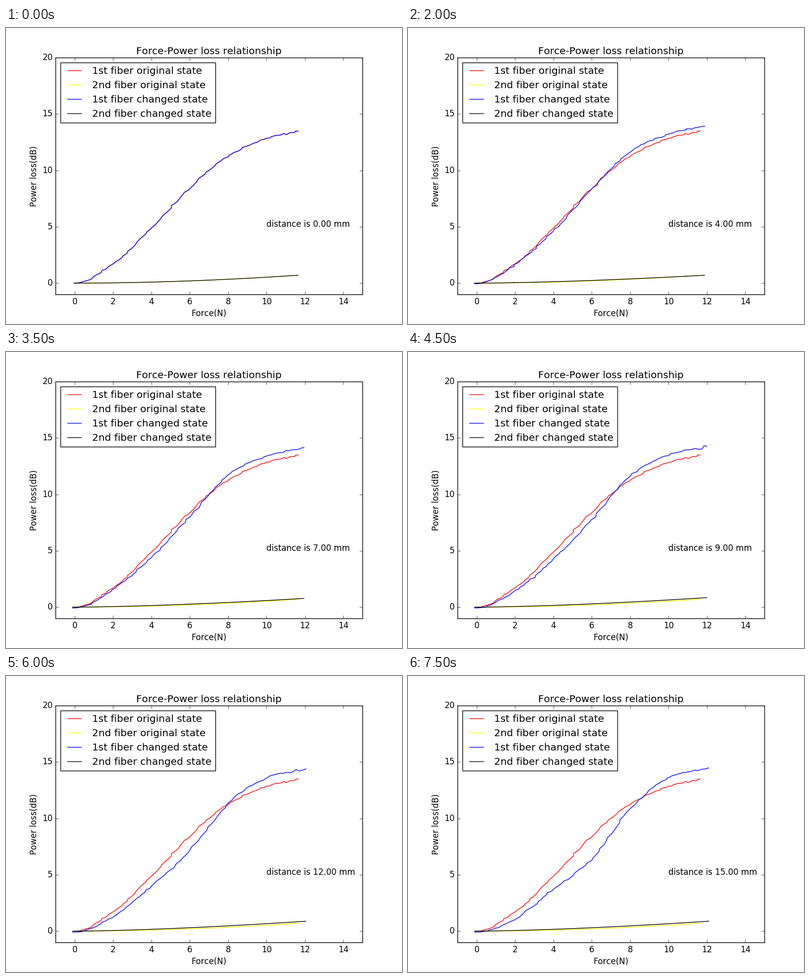
Write a matplotlib script that moves like this. It is 800 px wide and 600 px high and loops after 8000 ms.

```python
import numpy as np
import matplotlib.pyplot as plt
from matplotlib.animation import FuncAnimation

plt.style.use("classic")
plt.rcParams.update({"font.family": "DejaVu Sans", "text.kerning_factor": 6})

STEPS = 16  # displacement grows by 1 mm per step

# First fiber's loss (dB) every 2 N, with the fiber at rest, halfway and fully moved
FORCES = np.arange(0, 13, 2)
REST = np.array([0.00, 1.70, 4.87, 8.48, 11.27, 12.82, 13.62])
HALF = np.array([-0.08, 1.52, 4.34, 7.97, 11.70, 13.42, 14.18])
FULL = np.array([-0.08, 1.08, 3.70, 6.40, 10.85, 13.60, 14.48])


def smooth(x, kx, ky):
    """Cubic Hermite curve through the knots, flat at the first one."""
    m = np.gradient(ky, kx)
    m[0] = 0
    x = np.clip(x, kx[0], kx[-1])
    i = np.clip(np.searchsorted(kx, x) - 1, 0, len(kx) - 2)
    h = kx[i + 1] - kx[i]
    t = (x - kx[i]) / h
    return ((1 + 2 * t) * (1 - t) ** 2 * ky[i] + t * (1 - t) ** 2 * h * m[i]
            + t * t * (3 - 2 * t) * ky[i + 1] + t * t * (t - 1) * h * m[i + 1])


def trace(d):
    """Force and both fibers' power loss at displacement d."""
    u = d / (STEPS - 1)
    knots = ((2 * u - 1) * (u - 1) * REST + 4 * u * (1 - u) * HALF
             + u * (2 * u - 1) * FULL)
    first = -0.03 - 0.08 * min(d, 1)
    last = 11.65 + 0.45 * np.sqrt(u)
    base = np.linspace(first, last, 92)

    # Sensor noise: the load wavers throughout, the loss mostly near its plateau
    rng = np.random.default_rng(d)
    force = base + rng.normal(0, 0.04, base.size)
    force[[0, -1]] = first, last
    wobble = 0.01 + 0.04 * np.clip((base - 9) / 2, 0, 1)
    wobble[-1] = 0
    loss = smooth(base, FORCES, knots) + wobble * rng.normal(size=base.size)

    top = 0.70 + 0.18 * np.clip((d - 5) / 5, 0, 1)
    loss2 = top * np.clip(force / last, 0, None) ** (1.5 + 0.4 / (1 + d))
    return force, loss, loss2


fig = plt.figure(figsize=(8, 6), dpi=100, facecolor="white")
ax = fig.add_axes([0.125, 0.1, 0.775, 0.8])
ax.set(xlim=(-1, 15), ylim=(-1, 20), xticks=range(0, 15, 2), yticks=range(0, 21, 5),
       xlabel="Force(N)", ylabel="Power loss(dB)")
ax.set_title("Force-Power loss relationship")

force, loss, loss2 = trace(0)
ax.plot(force, loss, color="red", label="1st fiber original state")
ax.plot(force, loss2, color="yellow", label="2nd fiber original state")
line1, = ax.plot([], [], color="blue", label="1st fiber changed state")
line2, = ax.plot([], [], color="black", label="2nd fiber changed state")
ax.legend(loc="upper left")
note = ax.text(10, 5, "")


def update(d):
    force, loss, loss2 = trace(d)
    line1.set_data(force, loss)
    line2.set_data(force, loss2)
    note.set_text(f"distance is {d:.2f} mm")
    return line1, line2, note


anim = FuncAnimation(fig, update, frames=STEPS, interval=500, repeat=True)
plt.show()
```
